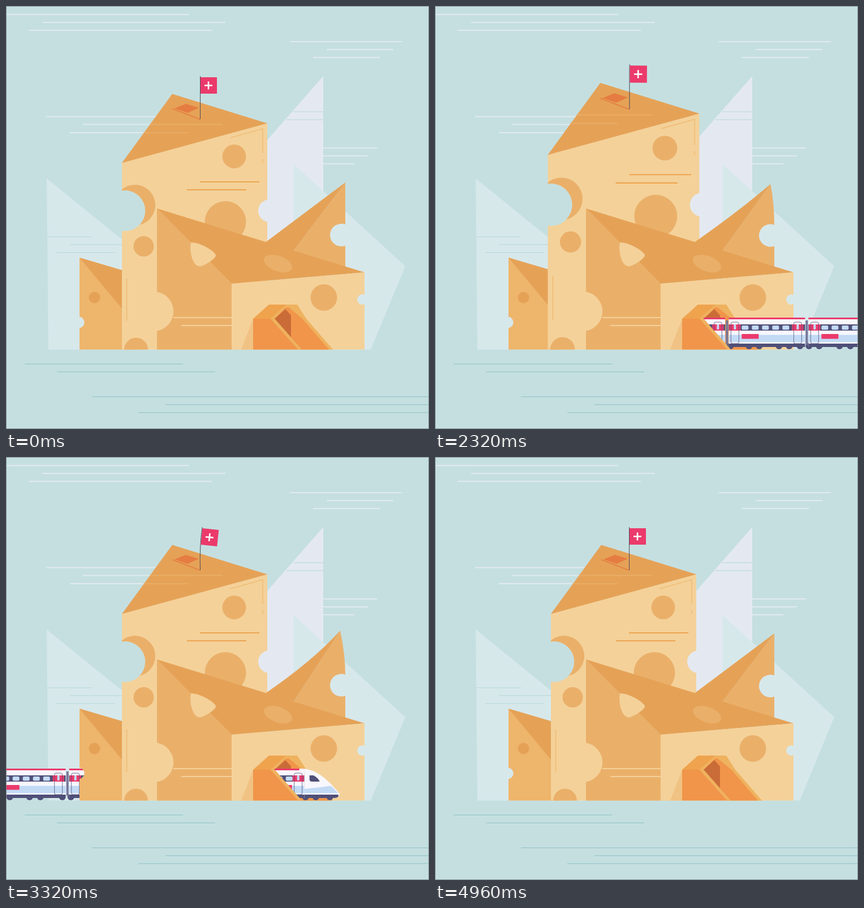
An HTML page with a canvas that plays this animation: 748x748 px, repeating every 5600 ms.

```html
<!DOCTYPE html>
<html lang="en">
<head>
<meta charset="utf-8">
<title>Cheese tunnel</title>
<style>
html, body { margin: 0; width: 100%; height: 100%; overflow: hidden; background: #c5dfe0; }
canvas { display: block; }
</style>
</head>
<body>
<canvas id="stage" width="748" height="748"></canvas>
<script>
const ctx = document.getElementById('stage').getContext('2d');
const LOOP = 5600;
const SKY = '#c5dfe0', PALE = '#d7e8eb', LILAC = '#e4e9f1', MIST = '#e1eaef', WATER = '#a9cfd2';
const LIGHT = '#f4d199', MID = '#eab06a', DARK = '#e5a257', ORANGE = '#f0954a', RUST = '#e57c41';
const RED = '#eb3a6b', NAVY = '#4f4f78', WHITE = '#f8f7ff', BLUE = '#c3daf5';

function fill(path, color) {
  ctx.fillStyle = color;
  ctx.fill(new Path2D(path));
}
function stroke(path, color, width = 2) {
  ctx.strokeStyle = color;
  ctx.lineWidth = width;
  ctx.stroke(new Path2D(path));
}
function rect(x, y, w, h, color, radius = 0) {
  ctx.fillStyle = color;
  ctx.beginPath();
  ctx.roundRect(x, y, w, h, radius);
  ctx.fill();
}
function disc(x, y, r, color) {
  ctx.fillStyle = color;
  ctx.beginPath();
  ctx.arc(x, y, r, 0, 7);
  ctx.fill();
}
function layer(draw, clip) {
  ctx.save();
  if (clip) ctx.clip(new Path2D(clip));
  draw();
  ctx.restore();
}
// Smooth interpolation through [time, value] keys
function keyed(t, keys) {
  if (t <= keys[0][0]) return keys[0][1];
  for (let i = 1; i < keys.length; i++) {
    const [t0, a] = keys[i - 1], [t1, b] = keys[i];
    if (t < t1) {
      const k = (t - t0) / (t1 - t0);
      return a + (b - a) * k * k * (3 - 2 * k);
    }
  }
  return keys[keys.length - 1][1];
}

function background() {
  rect(0, 0, 748, 748, SKY);
  stroke('M0 15H323M64 29H388M40 43H364M502 63H700M567 77H685M543 91H661M71 195.5H290M136 209.5H290M113 224H290', MIST);
  fill('M72 305L300 490V607.5H75Z', PALE);
  stroke('M72 408H152M113 422H215M89 436H193', SKY);
  fill('M561 124V440H440V262Z', LILAC);
  stroke('M508 187H563M496 201H563', '#cbdfe4');
  fill('M508 279L706 460L645 607.5H508Z', PALE);
  stroke('M561 251H656M561 265H640M561 279H616', MIST);
  stroke('M33 633H313M90 647H370M152 691H748M282 705H748M234 719H748', WATER);
}

function livery(x, w) {
  rect(x, 551, w, 52, WHITE);
  rect(x, 551, w, 3, RED);
  rect(x, 563, w, 11, NAVY);
  rect(x, 581.5, w, 13, BLUE);
  rect(x, 597, w, 6, NAVY);
}
function door(x) {
  rect(x - 3, 563, 20, 11, RED);
  rect(x + 5, 563, 4, 9, BLUE, 1);
  ctx.strokeStyle = NAVY;
  ctx.lineWidth = 0.8;
  ctx.beginPath();
  ctx.roundRect(x, 559, 14, 38, 3);
  ctx.stroke();
}
function fittings(firstDoor, firstWindow, lastDoor, plate) {
  door(firstDoor);
  door(lastDoor);
  for (let i = 0; i < 5; i++) rect(firstWindow + i * 18, 565, 12, 7.5, BLUE, 2);
  if (plate !== undefined) rect(plate, 580, 30, 8.5, RED);
}
function wheels(...xs) {
  for (const x of xs) disc(x, 601, 6, NAVY);
}

function engine() {
  wheels(-226, -176, -158, -121, -102, -67, -48, -9);
  layer(() => {
    livery(-138, 135);
    rect(-245, 551, 108, 52, WHITE);
    fill('M-245 599C-240 588 -200 551 -165 551H-135V554C-168 554 -180 568 -200 579Q-215 586 -241 586Z', RED);
    fill('M-217 582L-206 573.5H-191L-194 578Q-198 582 -204 582Z', NAVY);
    fill('M-209 572L-201 566H-182L-190 573.5Z', BLUE);
    fill('M-197 566L-188 560H-176L-183 566Z', NAVY);
    disc(-227, 579, 1.5, NAVY);
    fill('M-200 594.5Q-195 582 -180 581.5H-137V594.5Z', BLUE);
    rect(-245, 594.5, 50, 9, '#7477a3');
    rect(-197, 597, 62, 6, NAVY);
    fill('M-164 574Q-163 569 -154 564.5L-147 563V574Z', NAVY);
  }, 'M-245 599C-240 588 -200 551 -165 551H-3V603H-235Q-245 603 -245 599Z');
  fittings(-133, -115, -23, -115);
}
function coach(axles) {
  wheels(...axles);
  livery(3, 135);
  fittings(7, 26, 118, 26);
}
function tailEngine() {
  wheels(4, 22, 40, 75, 93, 139, 157, 182);
  layer(() => {
    livery(3, 134);
    rect(137, 551, 64, 52, WHITE);
    fill('M128 551H140L150 554.5H128Z', WHITE);
    fill('M146 563H153Q161 567 164 574H150Q146 574 146 570Z', NAVY);
    fill('M137 594.5V587Q165 584 184 581.5L197 594.5Z', BLUE);
    rect(137, 597, 60, 6, NAVY);
  }, 'M3 551H130C160 551 180 573 199 595Q200 603 188 603H3Z');
  fittings(9, 32, 119, 85);
}
function train(x, clip) {
  const parts = [
    [-282, engine],
    [-282, () => coach([6, 39, 57, 92, 110, 129])],
    [-141, () => coach([4, 22, 58, 77, 110, 129])],
    [0, tailEngine]
  ];
  layer(() => {
    for (const [dx, draw] of parts) {
      layer(() => {
        ctx.translate(x + dx, 0);
        draw();
      });
    }
    for (const dx of [-282, -141, 0]) rect(x + dx - 2, 556, 4, 43, '#77779b');
  }, clip);
}

function smallCheese() {
  fill('M130 445L225 473V607.5H130V569.4A10 10 0 0 0 130 549.6Z', '#eeb56c');
  fill('M130 445L225 473V559Z', DARK);
  disc(156.5, 515.5, 10, DARK);
}

function flag(sway) {
  const top = 343.5 + sway * 0.6;
  stroke(`M343.5 200Q${343.5 - sway * 0.25} 158 ${top} 124`, '#4c4a55', 1);
  layer(() => {
    ctx.translate(top, 124);
    ctx.rotate(sway * Math.PI / 180);
    rect(0.5, 2, 29, 29, RED);
    stroke('M7.5 16.5H21.5M14.5 9.5V23.5', '#fff', 2.6);
  });
}
function tower(scale, sway) {
  const face = 'M205 277L462 207V342.4A20 20 0 0 0 462 381.6V607.5H205V397.6A36 36 0 1 0 205 326.4Z';
  layer(() => {
    ctx.translate(333.5, 607.5);
    ctx.scale(scale, scale);
    ctx.translate(-333.5, -607.5);
    fill(face, LIGHT);
    layer(() => {
      disc(228, 352, 36, MID);
      disc(403.5, 266, 21, MID);
      disc(388, 381.5, 36.5, MID);
      disc(243.5, 425, 18, MID);
      disc(230, 607.5, 21, MID);
    }, face);
    fill('M205 277.5L294 155.5L462 207.5Z', DARK);
    stroke('M254 209.5H383M243 224H323', MID, 1.5);
    stroke('M343 311H448M320 325H425', '#eda552');
    stroke('M397 233L454 217V260M454 271V278M213.5 482V557', '#eebd78', 1.6);
    fill('M298 181L318 173L341 180L321 189Z', RUST);
    stroke('M294 181.5L343.5 200.5', RUST, 1.6);
    flag(sway);
  });
}

function rightCheese(dx, dy) {
  const peak = `${600 + dx} ${312 + dy}`;
  const hole = dy * 0.3;
  fill(`M${peak}Q600 350 600 ${386.3 + hole}A20 20 0 1 0 600 ${423.7 + hole}V470H509V432Z`, MID);
  fill(`M460 417Q${530 - dx * 1.5} ${364.5 + dx * 0.55} ${peak}L509 432L490 450Z`, DARK);
}

function frontCheese() {
  fill('M267 358L399 491V607.5H267Z', MID);
  fill('M267 505.5A35 35 0 0 1 267 574.5Z', LIGHT);
  stroke('M296 551H399M310 565H399', LIGHT);
  fill('M267 358L634 471L399 491Z', DARK);
  fill('M327 418C345 418 371 435 371 441C371 446 355 457 345 460C329 463 324 432 327 418Z', LIGHT);
  ctx.fillStyle = MID;
  ctx.beginPath();
  ctx.ellipse(481, 455.5, 26, 13.5, 0.35, 0, 7);
  ctx.fill();
  fill('M399 491L634 471V510.9A9 9 0 1 0 634 527.1V607.5H399Z', LIGHT);
  disc(562, 515.5, 23.5, MID);
}
function tunnelBack() {
  fill('M437 553V607.5H416Z', '#f0c283');
  fill('M468 553L496 528H515L531 553L578 607.5H517Z', '#efb25e');
  fill('M475 553L495 533H500L524 553L571 607.5H522Z', ORANGE);
  fill('M475 553L494 536L504 547V586Z', '#c96c38');
}
function tunnelFront() {
  fill('M437 553L465 528H496L468 553Z', '#efa34d');
  fill('M437 553H468L517 607.5H437Z', ORANGE);
  fill('M468 553H475L523 607.5H517Z', '#efb25e');
}

function frame(now) {
  const t = now % LOOP;
  const u = t - 3120;
  const trainX = 474 - 0.415 * u + 1.42e-8 * u ** 3;
  const scale = keyed(t, [[2080, 1], [2420, 1.054], [2600, 0.985], [2780, 1.012], [2960, 1]]);
  const swing = keyed(t, [[2200, 0], [2550, 6], [3350, 6], [3850, 0]]);
  const sway = swing * Math.sin(2 * Math.PI * (t - 3180) / 560);
  const peakX = keyed(t, [[1780, 0], [1960, -9], [2600, -5], [3320, -9], [3560, 3], [3760, 0]]);
  const peakY = keyed(t, [[1780, 0], [1960, -2], [2600, 6], [3320, -5], [3600, 1], [3760, 0]]);

  background();
  train(trainX, 'M0 540H140V620H0Z');
  smallCheese();
  tower(scale, sway);
  rightCheese(peakX, peakY);
  frontCheese();
  tunnelBack();
  train(trainX, 'M475 540V553L523 607.5V620H748V540Z');
  tunnelFront();
  ctx.strokeStyle = '#7f8f91';
  ctx.lineWidth = 1;
  ctx.strokeRect(0.5, 0.5, 747, 747);
  requestAnimationFrame(() => frame(performance.now() - start));
}
const start = performance.now();
frame(0);
</script>
</body>
</html>
```
